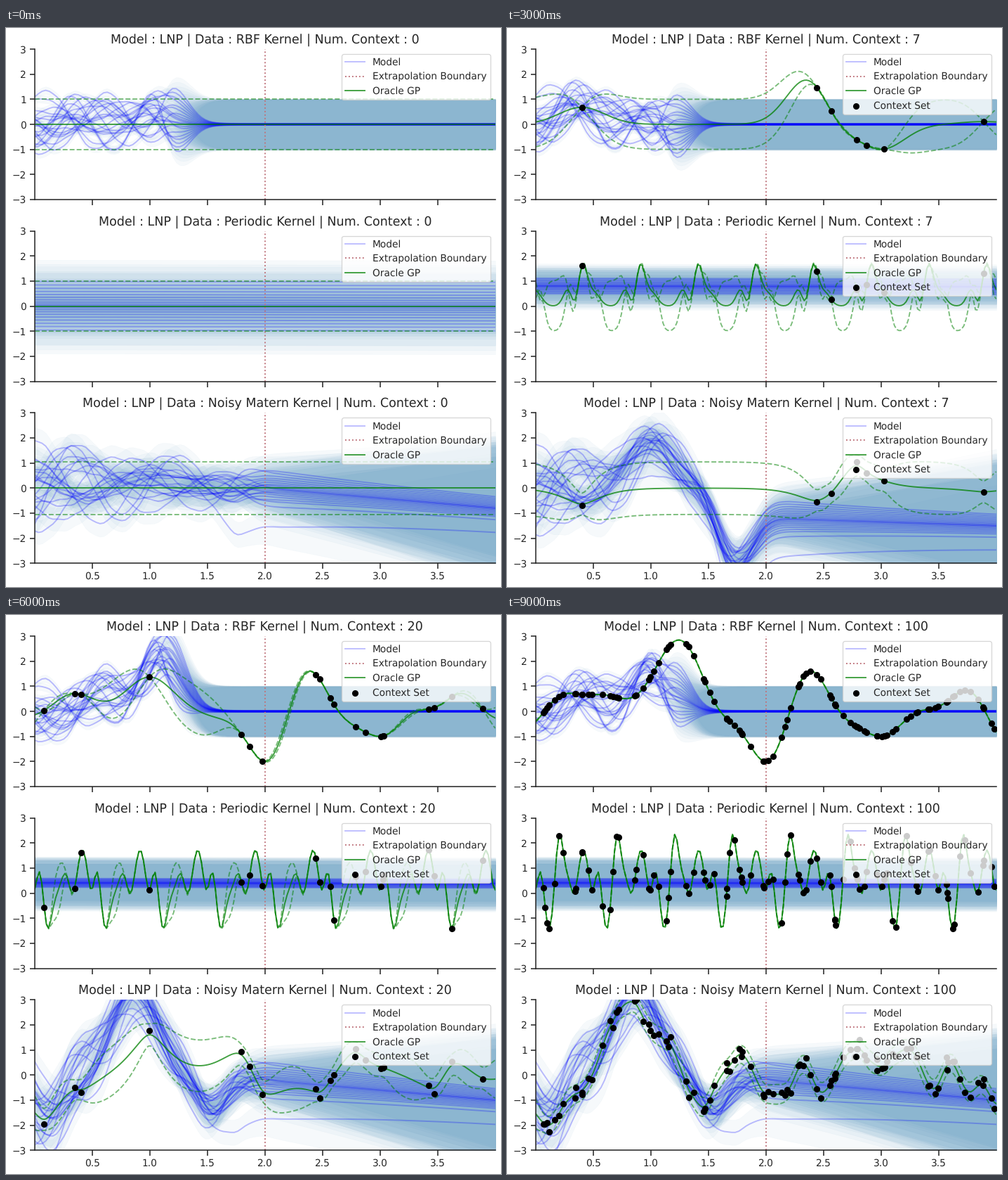
A matplotlib script that plays this animation: 705 px wide and 795 px high, repeating every 10000 ms.

```python
import numpy as np
import matplotlib.pyplot as plt
from matplotlib.animation import FuncAnimation

W, H, DPI = 705, 795, 80
PT = 90 / DPI
INK = "#262626"
plt.rcParams.update({
    "font.family": "DejaVu Sans", "font.size": 11 * PT,
    "text.hinting": "none",
    "axes.titlesize": 14 * PT, "axes.titlepad": 6 * PT,
    "axes.linewidth": 1.25 * PT, "axes.edgecolor": INK,
    "xtick.color": INK, "ytick.color": INK, "text.color": INK,
    "xtick.major.size": 6 * PT, "ytick.major.size": 6 * PT,
    "xtick.major.width": 1.25 * PT, "ytick.major.width": 1.25 * PT,
    "xtick.major.pad": 3.5 * PT, "ytick.major.pad": 3.5 * PT,
    "lines.linewidth": 1.5 * PT, "legend.fontsize": 11 * PT,
    "patch.linewidth": 1 * PT,
})

COUNTS = [0, 2, 5, 7, 10, 15, 20, 30, 50, 100]
SAMPLES = 20
BAND = "#5093be"
rng = np.random.default_rng(11)
X = np.linspace(0.003, 3.997, 128)
GRID = np.linspace(0.003, 3.997, 200)


# ---- Gaussian processes ----
def rbf(a, b):
    return np.exp(-0.5 * ((a[:, None] - b) / 0.2) ** 2)


def periodic(a, b):
    return np.exp(-8 * np.sin(2 * np.pi * (a[:, None] - b)) ** 2)


def matern(a, b):
    r = np.sqrt(3) * np.abs(a[:, None] - b) / 0.2
    return (1 + r) * np.exp(-r)


def posterior(kernel, noise, cx, cy, x):
    if len(cx) == 0:
        return np.zeros_like(x), np.full_like(x, np.sqrt(1 + noise))
    gram = kernel(cx, cx) + noise * np.eye(len(cx))
    cross = kernel(x, cx)
    mean = cross @ np.linalg.solve(gram, cy)
    var = 1 - np.sum(cross * np.linalg.solve(gram, cross.T).T, axis=1)
    return mean, np.sqrt(np.maximum(var, 0) + noise)


def even_curve(kernel, span, heights, x):
    """Curve through evenly spaced heights."""
    knots = np.arange(len(heights)) * span
    return posterior(kernel, 1e-4, knots, np.array(heights), x)[0]


def eased_curve(points, x):
    """Cosine easing from one turning point to the next."""
    px, py = np.array(points).T
    i = np.clip(np.searchsorted(px, x) - 1, 0, len(px) - 2)
    u = np.clip((x - px[i]) / (px[i + 1] - px[i]), 0, 1)
    return py[i] + (py[i + 1] - py[i]) * (1 - np.cos(np.pi * u)) / 2


# ---- context set ----
FIRST = [2.784, 2.872, 2.442, 3.021, 2.567, .402, 3.887, 3.008, 3.029, 3.622,
         .085, 1.796, 1.979, 2.598, 3.418]
later = np.arange(1, 101 - len(FIRST)) * (np.sqrt(5) - 1) / 2 % 1 * 4
later = np.clip(later + rng.normal(0, .04, len(later)), .005, 3.98)
CX = np.concatenate([FIRST, later])

RBF_Y = even_curve(rbf, .2, [
    -.42, .58, .68, .66, .51, 1.38, 2.78, 1.95, .02, -.95, -2,
    -.1, 1.6, .26, -.65, -1, -.4, .08, .5, .7, -.85], CX)
PERIODIC_Y = even_curve(periodic, .5 / 12, [
    .15, .85, -.48, -1.38, .5, 2.35, 1.4, .52, 0, .95, 1.72, .92], CX)
MATERN_Y = eased_curve([
    (0, -1.1), (.1, -2), (.4, -.7), (.8, 3.05), (1.05, 1.7), (1.47, -1.3),
    (1.77, 1), (2, -.82), (2.13, -.8), (2.34, .5), (2.46, -.6), (2.79, 1.06),
    (2.95, .2), (3.25, 1), (3.45, -.5), (3.62, .55), (3.76, -.8),
    (3.88, -.15), (4, -1.4)], CX)
MATERN_Y[len(FIRST):] += rng.normal(0, .2, len(later))


# ---- model samples ----
def bump(center, width):
    return np.exp(-((X - center) / width) ** 2)


def rise(at, width):
    return 1 / (1 + np.exp(-(X - at) / width))


def waves(lo, hi):
    freq = rng.uniform(lo, hi, (SAMPLES, 3, 1))
    phase = rng.uniform(0, 2 * np.pi, (SAMPLES, 3, 1))
    ripple = .03 * np.sin(45 * X + rng.uniform(0, 6, (SAMPLES, 1)))
    return np.cos(freq * X + phase).sum(axis=1) / np.sqrt(1.5) + ripple


def settle(wave, level, at, width):
    """Waves turn into fixed levels past a point."""
    w = rise(at, width)
    return wave * (1 - w) + level * w


u = rng.permutation(np.linspace(-1, 1, SAMPLES))[:, None]
LEVEL = 1.9 * np.sign(u) * np.abs(u) ** 1.4
SPREAD = rng.normal(0, 1, (SAMPLES, 1))

RBF_SHAPE = settle(waves(4, 10), LEVEL, 1.1, .05)
RBF_AMP = (.52 + .25 * bump(1.2, .15)) * (1 - rise(1.38, .06)) + .015
RBF_STD = .15 + .85 * rise(1.27, .07)

# one stray sample dives below the rest
stray = LEVEL.copy()
stray[0] = -4
MAT_SHAPE = settle(waves(3, 8), stray, 1.85, .06)
MAT_SHAPE[0] -= 3.5 * bump(1.77, .15)
MAT_AMP = .18 + .75 * np.exp(-X / 1.6)
MAT_STD = .5 + .95 * np.maximum(X - 1.8, 0)


def rbf_model(n):
    if n < 5:
        mean = .3 * bump(.3, .15) + (.35 - .2 * n) * bump(1.05, .2)
    elif n < 20:
        mean = .85 * bump(.32, .2) + .2 * bump(.85, .12) - .1 * bump(1.2, .15)
    elif n < 50:
        mean = .6 * bump(.6, .2) + 2.2 * bump(1.1, .23)
    else:
        mean = .7 * bump(.37, .2) + 1.5 * bump(.97, .2) + .4 * bump(1.27, .15)
    return mean + RBF_AMP * RBF_SHAPE, RBF_STD * (1 + .01 * SPREAD)


def flat_model(n):
    dip = np.exp(-((n - 6) / 2.7) ** 2)
    mean = .4 * (1 - np.exp(-n)) + .45 * dip
    spread = .09 + .42 * np.exp(-n / 4)
    std = (.92 - .35 * dip) * (1 + .07 * SPREAD)
    return mean + spread * LEVEL - .008 * (X - 2), std * np.ones_like(X)


def matern_model(n):
    shelf = rise(1.85, .05)
    if n == 0:
        mean = .15 * (1 - shelf)
    elif n < 15:
        mean = 1.6 * bump(1, .28) - 2.7 * bump(1.73, .2) - 1.2 * shelf
        mean += bump(.45, .25) * (n < 5)
    else:
        peak = 2.1 if n < 20 else 3.2
        mean = (peak * bump(.86, .28) - 1.7 * bump(.12, .2)
                - 1.2 * bump(1.53, .18) - .2 * shelf)
    drop = .15 if 0 < n < 15 else .4
    mean = mean - drop * np.maximum(X - 2, 0)
    return mean + MAT_AMP * MAT_SHAPE, MAT_STD * (1 + .1 * SPREAD)


PANELS = [("RBF", rbf, 1e-5, RBF_Y, rbf_model),
          ("Periodic", periodic, 1e-4, PERIODIC_Y, flat_model),
          ("Noisy Matern", matern, .1, MATERN_Y, matern_model)]

fig = plt.figure(figsize=(W / DPI, H / DPI), dpi=DPI, facecolor="white")
axes = [fig.add_axes([41 / W, 1 - bottom / H, 655.8 / W, 213.8 / H])
        for bottom in (243.9, 502.6, 761.3)]


def draw_panel(ax, n, panel, last):
    name, kernel, noise, cy, model = panel
    ax.clear()
    lines, stds = model(n)
    for y, s in zip(lines, stds):
        ax.fill_between(X, y - s, y + s, color=BAND, alpha=.047, lw=.5)
    for i, y in enumerate(lines):
        ax.plot(X, y, color="blue", alpha=.26,
                label="Model" if i == 0 else None)
    ax.axvline(2, color="#bf737b", ls=":", label="Extrapolation Boundary")
    mean, std = posterior(kernel, noise, CX[:n], cy[:n], GRID)
    ax.plot(GRID, mean, color="green", alpha=.75, label="Oracle GP")
    for edge in (mean - std, mean + std):
        ax.plot(GRID, edge, color="green", alpha=.52, ls="--")
    if n:
        ax.scatter(CX[:n], cy[:n], s=36 * PT ** 2, color="black",
                   lw=1.25 * PT, zorder=3, label="Context Set")
    ax.set(xlim=(X[0], X[-1]), ylim=(-3, 3), yticks=range(-3, 4),
           xticks=np.arange(.5, 4, .5))
    ax.tick_params(labelbottom=last)
    ax.spines[["top", "right"]].set_visible(False)
    ax.set_title(f"Model : LNP | Data : {name} Kernel | Num. Context : {n}")
    ax.legend(loc="upper right")


def draw(k):
    for ax, panel in zip(axes, PANELS):
        draw_panel(ax, COUNTS[k], panel, last=ax is axes[-1])
    return axes


anim = FuncAnimation(fig, draw, frames=len(COUNTS), interval=1000,
                     repeat=True, repeat_delay=0, blit=False)
plt.show()
```
